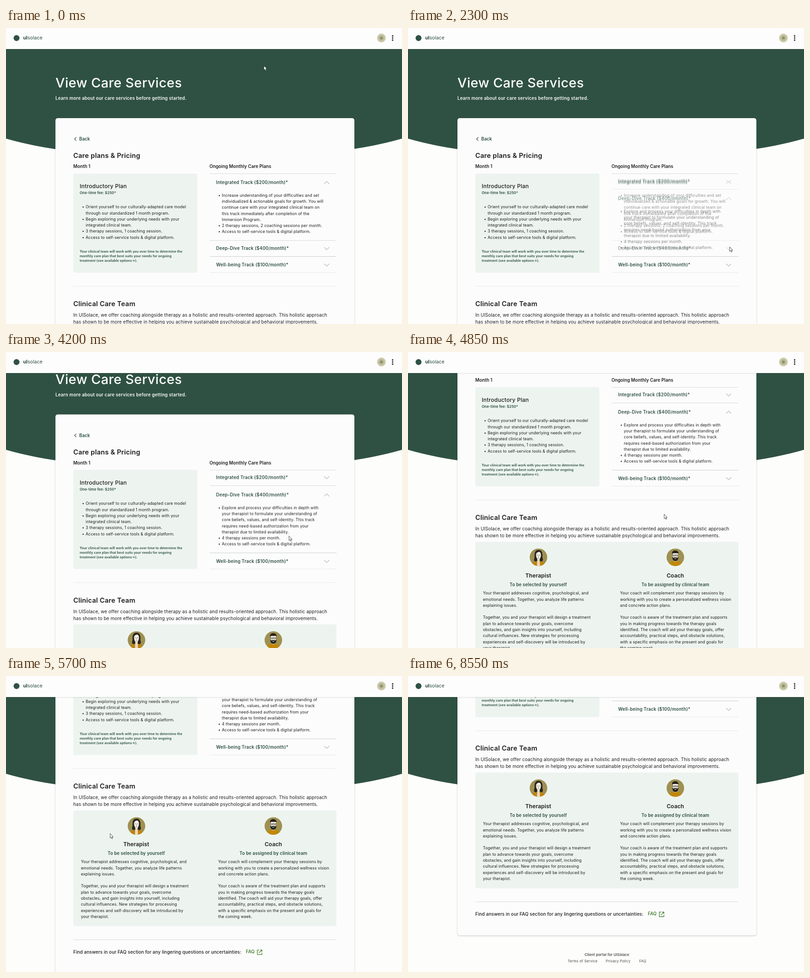
These frames come from a looping animation (865 by 647 pixels, 8600 ms). An HTML page:

```html
<!DOCTYPE html>
<html lang="en">
<head>
<meta charset="utf-8">
<title>View Care Services</title>
<style>
@property --scroll { syntax: '<length>'; inherits: true; initial-value: 0px; }

:root { --green: #2b4d3f; --ink: #1d1c1e; --pale: #edf4ef; --loop: 8.6s linear infinite; }
* { box-sizing: border-box; margin: 0; padding: 0; }
html, body { width: 100%; height: 100%; overflow: hidden; }
body {
  background: #fdfdfc; color: var(--ink);
  font-family: Inter, Lato, sans-serif; font-optical-sizing: none;
}
#stage { position: relative; width: 865px; height: 647px; overflow: hidden; animation: scroll var(--loop); }
#stage svg { position: absolute; overflow: visible; }
#hero { left: 0; top: 0; transform: translateY(max(-28px, -1 * var(--scroll))); }
#page { position: absolute; inset: 0; transform: translateY(calc(-1 * var(--scroll))); }

/* --x is the left edge, --y the middle of the first line */
.t {
  position: absolute; left: calc(var(--x) * 1px); top: calc(var(--y) * 1px);
  line-height: var(--l, 14px); margin-top: calc(var(--l, 14px) / -2);
  white-space: nowrap; list-style: none;
}
.mid { transform: translateX(-50%); }
.title { --l: 40px; font-size: 28.95px; font-weight: 500; letter-spacing: .013em; color: #fcfdfc; }
.h2 { --l: 20px; font-size: 14.6px; font-weight: 600; letter-spacing: .016em; }
.h3 { font-size: 12.06px; font-weight: 500; letter-spacing: .019em; }
.bold { font-size: 9.65px; font-weight: 600; letter-spacing: .01em; }
.track { letter-spacing: .026em; }
.lead { --l: 14.5px; font-size: 9.9px; letter-spacing: .0135em; }
.body { --l: 13.27px; font-size: 8.7px; letter-spacing: .014em; }
.note { --l: 9.65px; font-size: 7.24px; font-weight: 600; letter-spacing: .009em; }
.foot { font-size: 7.75px; letter-spacing: .025em; color: #4a4c49; }
.green { color: var(--green); }
.body li { position: relative; }
.body li::before { content: '•'; position: absolute; left: -8px; }

.box { position: absolute; border-radius: 4px; background: var(--pale); }
#card {
  left: 108px; top: 197px; width: 653px; height: 814.5px; border-radius: 5px;
  background: #fcfcfd; box-shadow: 0 1px 3px rgba(30, 40, 35, .28);
}
.hr {
  position: absolute; left: calc(var(--x, 444.5) * 1px); top: calc(var(--y) * 1px - .5px);
  width: calc(722px - var(--x, 444.5) * 1px); height: 1px; background: #d9dadc;
}
.soft { background: #e9e9ee; }
.chev {
  left: 695px; top: calc(var(--y) * 1px - 3px); width: 11px; height: 6px;
  fill: none; stroke: #85888a; stroke-width: 1;
}
.up { transform: scaleY(-1); }
.panel { position: absolute; left: 0; top: 0; }
#first { animation: leave var(--loop); }
#second { animation: enter var(--loop); }

#bar {
  position: absolute; left: 0; top: 0; width: 865px; height: 46px;
  background: #fdfdfe; box-shadow: 0 1px 2px rgba(20, 30, 25, .14);
}
#cursor { left: 0; top: 0; width: 8px; height: 13px; animation: point var(--loop); }

@keyframes enter { 0%, 25% { opacity: 0; } 28.3%, 100% { opacity: 1; } }
@keyframes leave { 0%, 25% { opacity: 1; } 28.3%, 100% { opacity: 0; } }
@keyframes scroll {
  0%, 46.2% { --scroll: 0px; animation-timing-function: ease-in-out; }
  47.9%, 49.4% { --scroll: 60.4px; animation-timing-function: ease-in-out; }
  51.2%, 52% { --scroll: 120.7px; animation-timing-function: ease-in-out; }
  53.8%, 54.1% { --scroll: 181px; animation-timing-function: ease-in-out; }
  55.3%, 56.5% { --scroll: 241.3px; animation-timing-function: ease-in-out; }
  59.5%, 61% { --scroll: 301.6px; animation-timing-function: ease-in-out; }
  64%, 66.6% { --scroll: 362.2px; animation-timing-function: ease-in-out; }
  71%, 100% { --scroll: 445px; }
}
@keyframes point {
  0%, 3% { transform: translate(563px, 82px); animation-timing-function: ease-in-out; }
  17.4%, 28% { transform: translate(702px, 478px); animation-timing-function: ease-in-out; }
  35% { transform: translate(662px, 470px); }
  45.3% { transform: translate(626px, 414px); }
  48.8% { transform: translate(618px, 402px); }
  56.4% { transform: translate(559px, 354px); animation-timing-function: ease-in-out; }
  66.3% { transform: translate(227px, 344px); animation-timing-function: ease-in-out; }
  77.5% { opacity: 1; }
  78.5% { transform: translate(501px, 336px); }
  80% { opacity: 0; }
  100% { transform: translate(501px, 336px); opacity: 0; }
}
</style>
</head>
<body>
<div id="stage">
  <svg id="hero" width="865" height="300" fill="#2f5143">
    <rect width="865" height="187"/>
    <ellipse cx="432.5" cy="186" rx="519" ry="101"/>
  </svg>

  <main id="page">
    <h1 class="t title" style="--x:108;--y:120">View Care Services</h1>
    <p class="t bold track" style="--x:108;--y:153.5;color:#fcfdfc">Learn more about our care services before getting started.</p>

    <div id="card" class="box"></div>
    <svg style="left:149px;top:239px" width="6" height="8"><path d="M4.6 0L.8 3.8L4.6 7.6" fill="none" stroke="#2a3a33" stroke-width="1.1"/></svg>
    <p class="t bold green" style="--x:160;--y:243">Back</p>
    <h2 class="t h2" style="--x:147;--y:279">Care plans &amp; Pricing</h2>
    <p class="t bold" style="--x:147;--y:303.3">Month 1</p>
    <p class="t bold" style="--x:444.5;--y:303.3">Ongoing Monthly Care Plans</p>

    <div class="box" style="left:147px;top:318px;width:270.5px;height:217px"></div>
    <h3 class="t h3" style="--x:161;--y:345.5">Introductory Plan</h3>
    <p class="t note green" style="--x:161;--y:360.5;font-size:7.84px">One-time fee: $250*</p>
    <ul class="t body" style="--x:174;--y:392">
      <li>Orient yourself to our culturally-adapted care model<br>through our standardized 1 month program.</li>
      <li>Begin exploring your underlying needs with your<br>integrated clinical team.</li>
      <li>3 therapy sessions, 1 coaching session.</li>
      <li>Access to self-service tools &amp; digital platform.</li>
    </ul>
    <p class="t note green" style="--x:161;--y:489">Your clinical team will work with you over time to determine the<br>monthly care plan that best suits your needs for ongoing<br>treatment (see available options→).</p>

    <div class="hr" style="--y:318"></div>
    <div class="panel" id="first">
      <p class="t bold track green" style="--x:459;--y:338.3">Integrated Track ($200/month)*</p>
      <svg class="chev up" style="--y:338.3"><path d="M0 .3L5.5 5.7L11 .3"/></svg>
      <ul class="t body" style="--x:471.5;--y:366.5">
        <li>Increase understanding of your difficulties and set<br>individualized &amp; actionable goals for growth. You will<br>continue care with your integrated clinical team on<br>this track immediately after completion of the<br>Immersion Program.</li>
        <li>2 therapy sessions, 2 coaching sessions per month.</li>
        <li>Access to self-service tools &amp; digital platform.</li>
      </ul>
      <div class="hr" style="--y:464.5"></div>
      <p class="t bold track green" style="--x:459;--y:482.3">Deep-Dive Track ($400/month)*</p>
      <svg class="chev" style="--y:482.3"><path d="M0 .3L5.5 5.7L11 .3"/></svg>
    </div>
    <div class="panel" id="second">
      <p class="t bold track green" style="--x:459;--y:335.2">Integrated Track ($200/month)*</p>
      <svg class="chev" style="--y:335.2"><path d="M0 .3L5.5 5.7L11 .3"/></svg>
      <div class="hr" style="--y:352.5"></div>
      <p class="t bold track green" style="--x:459;--y:373.3">Deep-Dive Track ($400/month)*</p>
      <svg class="chev up" style="--y:373.3"><path d="M0 .3L5.5 5.7L11 .3"/></svg>
      <ul class="t body" style="--x:471.5;--y:401.5">
        <li>Explore and process your difficulties in depth with<br>your therapist to formulate your understanding of<br>core beliefs, values, and self-identity. This track<br>requires need-based authorization from your<br>therapist due to limited availability.</li>
        <li>4 therapy sessions per month.</li>
        <li>Access to self-service tools &amp; digital platform.</li>
      </ul>
    </div>
    <div class="hr" style="--y:499.5;background:#cbcdce"></div>
    <p class="t bold track green" style="--x:459;--y:517.5">Well-being Track ($100/month)*</p>
    <svg class="chev" style="--y:517.5"><path d="M0 .3L5.5 5.7L11 .3"/></svg>
    <div class="hr soft" style="--y:534.5"></div>

    <div class="hr soft" style="--x:147;--y:564.5"></div>
    <h2 class="t h2" style="--x:147;--y:603">Clinical Care Team</h2>
    <p class="t lead" style="--x:147;--y:627.5">In UlSolace, we offer coaching alongside therapy as a holistic and results-oriented approach. This holistic approach<br>has shown to be more effective in helping you achieve sustainable psychological and behavioral improvements.</p>

    <div class="box" style="left:147px;top:656.3px;width:575px;height:253px"></div>
    <svg style="left:284.5px;top:689.7px" width="1" height="1">
      <clipPath id="round"><circle r="19.3"/></clipPath>
      <g clip-path="url(#round)">
        <circle r="19.3" fill="#9f9152"/>
        <path d="M-8 9Q-11 6 -8.5 0Q-10 -16 0 -16Q10 -16 8.5 0Q11 6 8 9Z" fill="#29251f"/>
        <path d="M-15 20Q-14 10 -5 8.5H5Q14 10 15 20Z" fill="#bd8412"/>
        <path d="M-2.7 1H2.7V8L3.5 20H-3.5L-2.7 8Z" fill="#ecd9bd"/>
        <path d="M-5.5 -6Q-4 -12 2 -12Q5.5 -10 5.5 -5Q5 4 0 4.5Q-5 4 -5.5 -6Z" fill="#f6f1e6"/>
        <path d="M-3.5 -5H-1.2M1.2 -5H3.5M0 -4V-1M-1.5 1.5H1.5" stroke="#4a4236" stroke-width=".8"/>
      </g>
    </svg>
    <svg style="left:584px;top:689.7px" width="1" height="1">
      <g clip-path="url(#round)">
        <circle r="19.3" fill="#9f9152"/>
        <path d="M-16 20Q-15 10 -5 8H5Q15 10 16 20Z" fill="#c08808"/>
        <path d="M-3 3H3V8.5Q0 11 -3 8.5Z" fill="#d8c7a4"/>
        <path d="M-6.5 -9H6.5V0Q5 7 0 7Q-5 7 -6.5 0Z" fill="#f4eee0"/>
        <path d="M-7 -6Q-9 -14 -1 -15Q8 -15 7 -6L5.5 -9H-5Z" fill="#25221f"/>
        <path d="M-6.8 -2L-4.5 1Q0 -1 4.5 1L6.8 -2Q7 8 0 8.5Q-7 8 -6.8 -2Z" fill="#25221f"/>
        <path d="M-2 3H2" stroke="#f4eee0" stroke-width="1"/>
        <path d="M-7 -5H7M-5.5 -5V-2.5H-1.2V-5M1.2 -5V-2.5H5.5V-5" fill="none" stroke="#25221f" stroke-width=".8"/>
      </g>
    </svg>
    <h3 class="t bold mid" style="--x:284.5;--y:729.8;font-size:12.06px">Therapist</h3>
    <h3 class="t bold mid" style="--x:584;--y:729.8;font-size:12.06px">Coach</h3>
    <p class="t bold mid green" style="--x:284.5;--y:750.3">To be selected by yourself</p>
    <p class="t bold mid green" style="--x:584;--y:750.3">To be assigned by clinical team</p>
    <p class="t body" style="--x:163.7;--y:769">Your therapist addresses cognitive, psychological, and<br>emotional needs. Together, you analyze life patterns<br>explaining issues.<br><br>Together, you and your therapist will design a treatment<br>plan to advance towards your goals, overcome<br>obstacles, and gain insights into yourself, including<br>cultural influences. New strategies for processing<br>experiences and self-discovery will be introduced by<br>your therapist.</p>
    <p class="t body" style="--x:463.2;--y:769">Your coach will complement your therapy sessions by<br>working with you to create a personalized wellness vision<br>and concrete action plans.<br><br>Your coach is aware of the treatment plan and supports<br>you in making progress towards the therapy goals<br>identified. The coach will aid your therapy goals, offer<br>accountability, practical steps, and obstacle solutions,<br>with a specific emphasis on the present and goals for<br>the coming week.</p>

    <div class="hr" style="--x:147;--y:938.5"></div>
    <p class="t lead" style="--x:147;--y:965.3;font-weight:500;letter-spacing:.01em">Find answers in our FAQ section for any lingering questions or uncertainties:</p>
    <p class="t bold" style="--x:524;--y:965.3;color:#4a8232">FAQ</p>
    <svg style="left:548px;top:959.5px" width="12" height="12"><path d="M5 1H1V11H11V7M7 1H11V5M11 1L4.5 7.5" fill="none" stroke="#4a8232" stroke-width="1.3"/></svg>

    <p class="t foot mid" style="--x:434.5;--y:1053.5;font-weight:600;letter-spacing:.02em">Client portal for UlSolace</p>
    <p class="t foot" style="--x:348.5;--y:1068">Terms of Service</p>
    <p class="t foot" style="--x:432;--y:1068">Privacy Policy</p>
    <p class="t foot" style="--x:505;--y:1068">FAQ</p>
  </main>

  <header id="bar">
    <svg width="865" height="46">
      <radialGradient id="photo">
        <stop offset="0" stop-color="#777a58"/>
        <stop offset=".45" stop-color="#b9b894"/>
        <stop offset="1" stop-color="#d8d4b8"/>
      </radialGradient>
      <circle cx="23" cy="22" r="6.5" fill="#2f5143"/>
      <circle cx="820" cy="21.8" r="9.7" fill="url(#photo)"/>
      <g fill="#1d1d1d">
        <circle cx="844.5" cy="17.3" r="1.6"/>
        <circle cx="844.5" cy="21.8" r="1.6"/>
        <circle cx="844.5" cy="26.3" r="1.6"/>
      </g>
    </svg>
    <p class="t green" style="--x:37.5;--y:22;font-size:10.6px"><b>ul</b>solace</p>
  </header>

  <svg id="cursor"><path d="M.4 .4V10.2L2.7 8.2L4.3 11.8L5.9 11.1L4.4 7.6H7.2Z" fill="#fff" stroke="#1c1c1e" stroke-width=".8" stroke-linejoin="round"/></svg>
</div>
</body>
</html>
```
